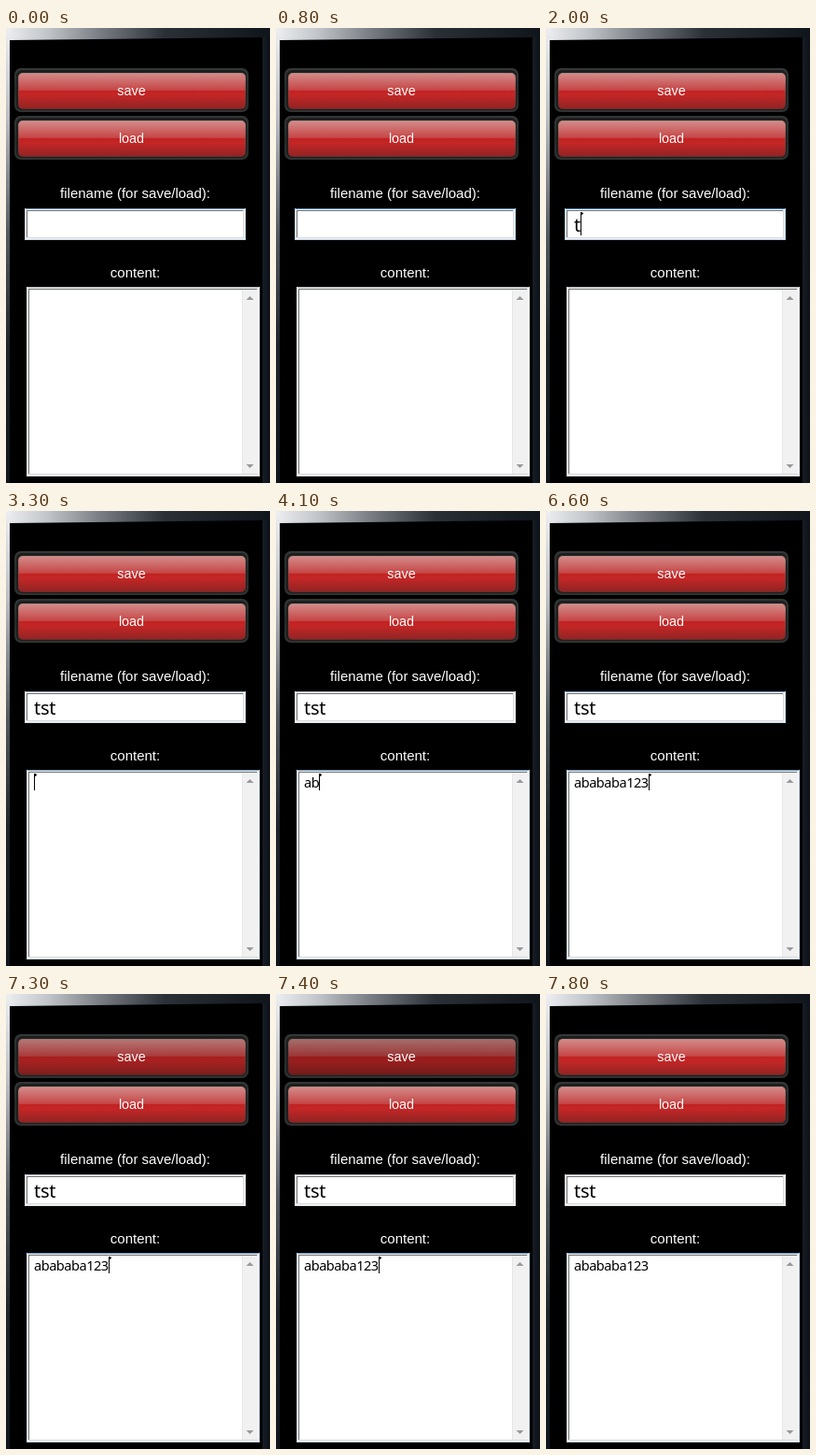
Animation, 283 px wide and 487 px high, one loop 8000 ms. Source, as an HTML page with a canvas:

```html
<!DOCTYPE html>
<html>
<head>
<meta charset="utf-8">
<style>
html, body { margin: 0; width: 100%; height: 100%; overflow: hidden; background: #000; }
canvas { display: block; }
</style>
</head>
<body>
<canvas id="stage" width="283" height="487"></canvas>
<script>
const ctx = document.getElementById('stage').getContext('2d');
const LOOP = 8000, STEP = 100, BLINK = 500;
const LABEL_FONT = '"Liberation Sans", Arial, sans-serif';
const INPUT_FONT = '"Noto Sans", sans-serif';

const snap = (t, step = STEP) => Math.floor(t / step) * step;
const ramp = (t, from, to) => Math.min(1, Math.max(0, (t - from) / (to - from)));
const mix = (a, b, k) => `rgb(${a.map((v, i) => Math.round(v + (b[i] - v) * k))})`;

// Evenly paced key presses
const keyRun = (start, pace, count) => Array.from({ length: count }, (_, i) => snap(start + pace * i));

const nameField = {
  value: 'tst', focus: 900, blur: 3200, keys: [2000, ...keyRun(2200, 100, 2)],
  font: '500 20px ' + INPUT_FONT, spacing: -.3, advance: 7.7, baseline: 218, caretY: 197, caretH: 25
};
const bodyField = {
  value: 'abababa123', focus: 3200, blur: LOOP, keys: [...keyRun(4030, 168, 7), ...keyRun(5900, 200, 3)],
  font: '14.6px ' + INPUT_FONT, spacing: -.5, advance: 8, baseline: 296, caretY: 281, caretH: 18
};

function rect(x, y, w, h, fill) {
  ctx.fillStyle = fill;
  ctx.fillRect(x, y, w, h);
}

function poly(fill, ...pts) {
  ctx.fillStyle = fill;
  ctx.beginPath();
  pts.forEach(p => ctx.lineTo(...p));
  ctx.fill();
}

function round(x, y, w, h, r, fill) {
  ctx.fillStyle = fill;
  ctx.beginPath();
  ctx.roundRect(x, y, w, h, r);
  ctx.fill();
}

function gradient(x0, y0, x1, y1, stops) {
  const g = ctx.createLinearGradient(x0, y0, x1, y1);
  stops.forEach(([at, color]) => g.addColorStop(at, color));
  return g;
}

function text(str, x, y, font, color, align = 'left', spacing = 0) {
  ctx.font = font;
  ctx.fillStyle = color;
  ctx.textAlign = align;
  ctx.letterSpacing = spacing + 'px';
  ctx.fillText(str, x, y);
}

function backdrop() {
  rect(0, 0, 283, 14, gradient(0, 0, 283, 0,
    [[0, '#eceef0'], [.15, '#c4c7cb'], [.35, '#7c8086'], [.6, '#2b3037'], [1, '#10151c']]));
  rect(0, 0, 5, 487, gradient(0, 0, 0, 487,
    [[0, '#eceef0'], [.2, '#b9bcc0'], [.45, '#555a61'], [.7, '#20252c'], [1, '#10151c']]));
  rect(275, 10, 8, 477, gradient(275, 0, 283, 0, [[0, '#171d26'], [1, '#0d1219']]));
  poly('#000', [4, 13], [275, 10], [275, 487], [4, 487]);
}

function button(label, y, press) {
  round(9, y, 251, 47, 7, gradient(0, y, 0, y + 47, [[0, '#343837'], [.5, '#262928'], [1, '#2f3332']]));
  round(11, y + 2, 247, 43, 6, '#1d1f1f');
  round(13, y + 5, 244, 39, 5, gradient(0, y + 5, 0, y + 44, [[0, '#b58a84'], [.5, '#8c4442'], [1, '#6a2a28']]));
  round(14, y + 6, 242, 37, 4, gradient(0, y + 6, 0, y + 43,
    [[0, '#d38a88'], [.47, '#c64646'], [.5, '#c22222'], [.62, '#c42626'], [1, '#922423']]));
  round(13, y + 5, 244, 39, 5, `rgba(0,0,0,${.22 * press})`);
  text(label, 134.5, y + 29, '14.4px ' + LABEL_FONT, '#fff', 'center');
}

function box(x, y, w, h, glow) {
  rect(x, y, w, h, mix([226, 227, 234], [181, 207, 231], glow));
  rect(x + 1, y, w - 2, 1, mix([171, 173, 179], [61, 123, 173], glow));
  rect(x + 1, y + 1, w - 2, h - 2, '#f4f4f4');
  rect(x + 2, y + 2, w - 4, h - 4, '#d8d9db');
  rect(x + 2, y + 2, w - 5, 1, '#6d7074');
  rect(x + 2, y + 2, 1, h - 5, '#6d7074');
  rect(x + 3, y + 3, w - 6, h - 6, '#fff');
}

// Text caret with a small direction flag at its top
function caret(x, y, h) {
  rect(x, y, 1, h, '#000');
  rect(x + 1, y, 1, 3, '#000');
  rect(x + 2, y + 1, 1, 1, '#000');
}

function typing(f, t) {
  const done = f.keys.filter(k => k <= t);
  const last = done.length ? done[done.length - 1] : f.focus;
  text(f.value.slice(0, done.length), 30, f.baseline, f.font, '#000', 'left', f.spacing);
  const lit = Math.floor((t - last) / BLINK) % 2 === 0;
  if (t >= f.focus && t < f.blur && lit) {
    caret(Math.floor(30 + f.advance * done.length), f.caretY, f.caretH);
  }
}

function scrollbar() {
  rect(253, 280, 17, 197, '#f1f1f1');
  rect(253, 280, 1, 197, '#e6e6e6');
  poly('#97999c', [257.5, 291], [261.5, 287], [265.5, 291]);
  poly('#97999c', [257.5, 467], [261.5, 471], [265.5, 467]);
}

// Hover, then focus, then fade out; later the pointer passes over once more
function nameGlow(t) {
  if (t < 3000) return .6 + .4 * ramp(t, 600, 900);
  if (t < 6600) return 1 - ramp(t, 3000, 3400);
  return .6 * (1 - ramp(snap(t, 200), 6600, 7200));
}

function draw(t) {
  backdrop();
  button('save', 43, t < 7500 ? ramp(t, 7100, 7400) : 0);
  button('load', 94, 0);

  text('filename (for save/load):', 138.5, 182, '15px ' + LABEL_FONT, '#fff', 'center');
  box(20, 193, 237, 34, nameGlow(t));
  typing(nameField, t);

  text('content:', 138.5, 267, '15px ' + LABEL_FONT, '#fff', 'center');
  box(22, 277, 250, 203, .7 * ramp(t, 3000, 3400));
  scrollbar();
  typing(bodyField, t);
}

const start = performance.now();
function tick() {
  draw(snap((performance.now() - start) % LOOP));
  requestAnimationFrame(tick);
}
tick();
</script>
</body>
</html>
```
